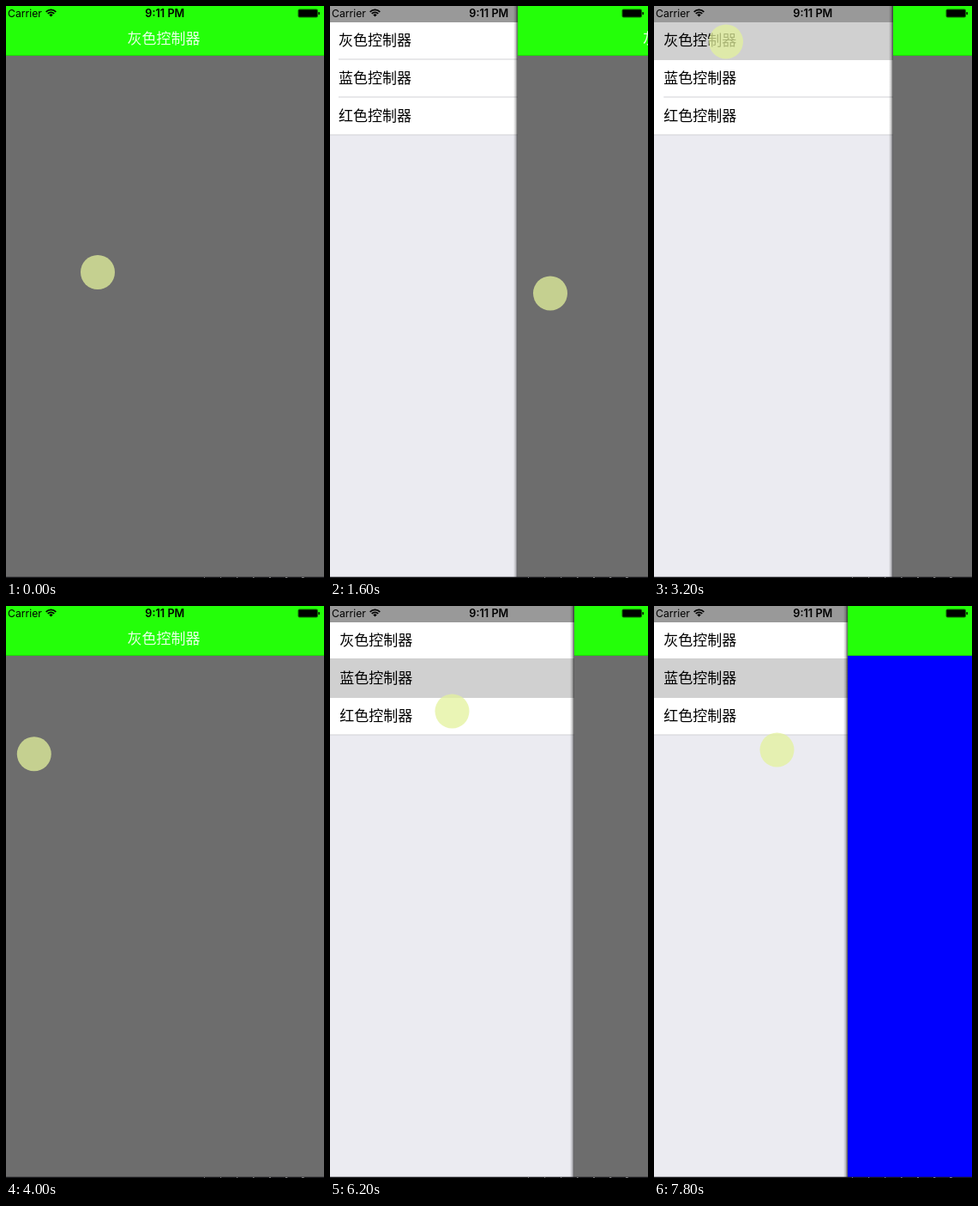
Recreate the animation shown at these times as an HTML page with a canvas. Size 371 px wide and 666 px high, loop 8 s.

```html
<!DOCTYPE html>
<html lang="zh-CN">
<head>
<meta charset="utf-8">
<title>侧滑菜单</title>
<style>
html, body { margin: 0; width: 100%; height: 100%; overflow: hidden; background: #ebebf1; }
canvas { display: block; width: 371px; height: 666px; }
</style>
</head>
<body>
<canvas id="stage"></canvas>
<script>
const W = 371, H = 666, LOOP = 8000, STEP = 200;
const LATIN = 'Inter, Roboto, sans-serif';
const CJK = '"Noto Sans CJK SC", "Noto Sans CJK", sans-serif';
const LIGHT_CJK = '"Noto Sans CJK SC Light", ' + CJK;
const GREEN = '#24ff09', GRAY = '#6d6d6d', BLUE = '#0000ff';
const ROWS = ['灰色控制器', '蓝色控制器', '红色控制器'];
const ROW_TOP = 18, ROW_H = 44, STATUS_H = 19, HEADER_H = 58;

// Drawer timing in ms: each opening takes OPEN_MS, each closing CLOSE_MS.
const OPEN_X = 309, OPEN_MS = 700, CLOSE_MS = 400;
const OPENINGS = [1150, 4358, 7338], CLOSINGS = [3123, 6132];
const FIRST_TAP = 2400, SECOND_TAP = 6000, PAGE_SWAP = 6400;

// Finger stops: time, x, y.
const STOPS = [
  [0, 107, 310], [800, 38, 322], [1600, 257, 334.5],
  [2400, 84, 41.5], [3200, 84, 41.5],
  [4200, 20, 205], [4800, 369, 216],
  [5400, 142, 88], [6200, 142.5, 122.5], [6800, 122.5, 201.5],
  [7300, 22, 214], [7800, 143.5, 167.5]
];

const canvas = document.getElementById('stage');
const ctx = canvas.getContext('2d');
const ratio = window.devicePixelRatio || 1;
canvas.width = W * ratio;
canvas.height = H * ratio;

function smooth(u) {
  const k = Math.min(1, Math.max(0, u));
  return k * k * (3 - 2 * k);
}

function panelX(t) {
  const progress = (starts, ms) =>
    starts.reduce((sum, start) => sum + smooth((t - start) / ms), 0);
  return Math.round(OPEN_X * (progress(OPENINGS, OPEN_MS) - progress(CLOSINGS, CLOSE_MS)));
}

function touchAt(t) {
  const i = STOPS.findIndex(stop => stop[0] >= t);
  const b = STOPS[i], a = STOPS[Math.max(0, i - 1)];
  const k = (t - a[0]) / (b[0] - a[0] || 1);
  return [1, 2].map(n => a[n] + (b[n] - a[n]) * k);
}

function rect(x, y, w, h, color) {
  ctx.fillStyle = color;
  ctx.fillRect(x, y, w, h);
}

function text(str, x, y, font, color, align = 'left') {
  ctx.font = font;
  ctx.fillStyle = color;
  ctx.textAlign = align;
  ctx.fillText(str, x, y);
}

function drawMenu(selected, inset) {
  rect(0, 0, W, H, '#ebebf1');
  rect(0, ROW_TOP, W, ROW_H * ROWS.length, '#fff');
  ROWS.forEach((label, i) => {
    const bottom = ROW_TOP + (i + 1) * ROW_H;
    const left = i === ROWS.length - 1 ? 0 : inset;
    rect(left, bottom - 0.5, W - left, 1, '#d2d2d6');
  });
  // The highlight covers the lines above and below its row.
  if (selected >= 0) rect(0, ROW_TOP + selected * ROW_H - 1, W, ROW_H + 2, '#d0d0d0');
  ROWS.forEach((label, i) => {
    text(label, inset, ROW_TOP + i * ROW_H + 28, '400 17px ' + CJK, '#000');
  });
  rect(0, 0, W, STATUS_H, '#999');
}

function drawPanel(x, color, title) {
  if (x > 0) {
    const shade = ctx.createLinearGradient(x - 5, 0, x, 0);
    shade.addColorStop(0, 'rgba(0,0,0,0)');
    shade.addColorStop(0.5, 'rgba(0,0,0,0.2)');
    shade.addColorStop(1, 'rgba(0,0,0,0.65)');
    rect(x - 5, 0, 5, H, shade);
  }
  rect(x, 0, W - x, H, color);
  rect(x, 0, W - x, HEADER_H, GREEN);
  rect(x, HEADER_H - 0.5, W - x, 0.5, 'rgba(0,0,0,0.3)');
  text(title, x + 184 + Math.min(x, 4.5), 44, '300 17px ' + LIGHT_CJK,
    'rgba(255,255,255,0.9)', 'center');
}

function drawWifi() {
  const cx = 52.5, cy = 12.6;
  const from = -Math.PI * 0.75, to = -Math.PI * 0.25;
  ctx.strokeStyle = ctx.fillStyle = '#000';
  ctx.lineWidth = 1.7;
  for (const r of [8.2, 5.3]) {
    ctx.beginPath();
    ctx.arc(cx, cy, r, from, to);
    ctx.stroke();
  }
  ctx.beginPath();
  ctx.moveTo(cx, cy);
  ctx.arc(cx, cy, 3.2, from, to);
  ctx.fill();
}

function pill(x, y, w, h, r, alpha) {
  ctx.fillStyle = `rgba(0,0,0,${alpha})`;
  ctx.beginPath();
  ctx.roundRect(x, y, w, h, r);
  ctx.fill();
}

function drawBattery() {
  pill(340.5, 3.5, 23.5, 10, 2, 0.6);
  pill(341.5, 4.5, 21.5, 8, 1, 1);
  pill(364.4, 6.9, 1.5, 3.4, 0.7, 1);
}

function drawStatus() {
  text('Carrier', 2, 13, '400 12.2px ' + LATIN, '#000');
  text('9:11 PM', 185.3, 13, '600 12.7px ' + LATIN, '#000', 'center');
  drawWifi();
  drawBattery();
}

function drawTouch([x, y]) {
  ctx.fillStyle = 'rgba(227,242,157,0.75)';
  ctx.beginPath();
  ctx.arc(x, y, 20, 0, Math.PI * 2);
  ctx.fill();
}

function drawBottomEdge() {
  rect(0, 664.7, W, 1.3, '#141418');
  for (let x = 231; x < 360; x += 19) {
    rect(x, 665, 5 + 4 * Math.sin(x), 1, '#77777a');
  }
}

function draw(now) {
  const t = Math.floor((now % LOOP) / STEP) * STEP;
  const selected = (t >= FIRST_TAP) + (t >= SECOND_TAP) - 1;
  const swapped = t >= PAGE_SWAP;
  ctx.setTransform(ratio, 0, 0, ratio, 0, 0);
  drawMenu(selected, selected < 0 ? 10 : 11.3);
  drawPanel(panelX(t), swapped ? BLUE : GRAY, ROWS[+swapped]);
  drawStatus();
  drawTouch(touchAt(t));
  drawBottomEdge();
}

const start = performance.now();
function tick() {
  draw(performance.now() - start);
  requestAnimationFrame(tick);
}
tick();
</script>
</body>
</html>
```
